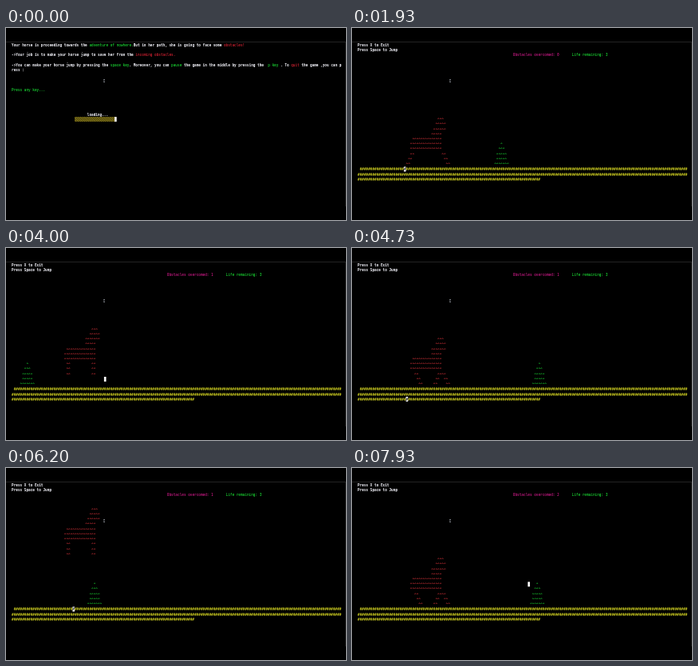
These frames come from a looping animation (426 by 240 pixels, 8000 ms). An HTML page with a canvas:

```html
<!DOCTYPE html>
<html lang="en">
<head>
<meta charset="utf-8">
<title>Horse jump</title>
<style>
html, body { margin: 0; width: 100%; height: 100%; overflow: hidden; background: #000; }
canvas { display: block; width: 100vw; height: 100vh; }
</style>
</head>
<body>
<canvas id="stage" width="426" height="240"></canvas>
<script>
const ctx = document.getElementById('stage').getContext('2d');

const LOOP = 8000, STEP = 1000 / 15;
const LEFT = 7, TOP = 18, CW = 2.633, CH = 6.23;
const WHITE = '#f8f8ff', GREEN = '#1eff3c', RED = '#ff283c',
      PINK = '#f01e9e', YELLOW = '#fafa28', HORSE = '#ff3c44';

// Each run of the obstacle: first step and columns moved per step.
const RUNS = [[10.9, 1.97], [62.6, 2.13], [110.1, 2.13]];
const START_COL = 104;

const INTRO = [
  [0, [['Your horse is proceeding towards the ', WHITE], ['adventure of nowhere.', GREEN],
       ['But in her path, she is going to face some ', WHITE], ['obstacles!', RED]]],
  [2, [['->Your job is to make your horse jump to save her from the ', WHITE],
       ['incoming obstacles.', RED]]],
  [4, [['->You can make your horse jump by pressing the ', WHITE], ['space key', GREEN],
       ['. Moreover, you can ', WHITE], ['pause', GREEN],
       [' the game in the middle by pressing the ', WHITE], [' p key', GREEN],
       [' . To ', WHITE], ['quit', RED], [' the game ,you can p', WHITE]]],
  [5, [['ress :', WHITE]]],
  [9, [['Press any key...', GREEN]]]
];

// Spans are [row, first column, length], rows counted from the head.
const BODY = [[0, 38, 3], [1, 37, 5], [3, 35, 5], [4, 26, 14], [5, 25, 15], [6, 25, 15]];
const LEGS = {
  stretch: [[7, 25, 2], [7, 40, 2], [8, 24, 2], [8, 41, 2], [9, 23, 2], [9, 42, 2]],
  gather: [[7, 27, 2], [7, 38, 4], [8, 28, 2], [8, 37, 2], [8, 41, 2],
           [9, 29, 2], [9, 36, 2], [9, 42, 2]],
  jump: [[7, 26, 2], [7, 38, 2], [8, 26, 2], [8, 38, 2], [9, 26, 2], [9, 38, 2]]
};
const GROUND_CURSOR = { 1: [60, 26], 10: [22, 25], 14: [23, 27], 17: [29, 25] };

const clamp = (v, lo, hi) => Math.min(hi, Math.max(lo, v));
const cellX = col => LEFT + col * CW;
const cellY = row => TOP + row * CH;

function print(text, col, row, color) {
  const weight = color === WHITE ? 'bold' : 'normal';
  ctx.save();
  ctx.translate(cellX(col), cellY(row) + 4.6);
  ctx.scale(0.1, 0.1);
  ctx.font = weight + ' 43.73px "DejaVu Sans Mono", monospace';
  ctx.fillStyle = color;
  ctx.fillText(text, 0, 0);
  ctx.restore();
}

function printParts(parts, row) {
  let col = 0;
  for (const [text, color] of parts) {
    print(text, col, row, color);
    col += text.length;
  }
}

function carets(col, row, count, color) {
  print('^'.repeat(count), col, row, color);
}

function cursor(col, row, char = '') {
  ctx.fillStyle = '#fff';
  ctx.fillRect(cellX(col), cellY(row) - 0.3, CW, 6);
  print(char, col, row, '#000');
}

function loadingBar(length) {
  const x = cellX(30), y = cellY(15) - 0.4, w = length * CW;
  ctx.save();
  ctx.beginPath();
  ctx.rect(x, y, w, CH);
  ctx.clip();
  ctx.fillStyle = '#51480c';
  ctx.fillRect(x, y, w, CH);
  ctx.strokeStyle = '#a39428';
  ctx.lineWidth = 0.7;
  ctx.beginPath();
  for (let i = -CH; i < w; i += CW) {
    ctx.moveTo(x + i, y);
    ctx.lineTo(x + i + CH, y + CH);
  }
  ctx.stroke();
  ctx.restore();
  cursor(30 + length, 15);
}

function drawIntro(step) {
  for (const [row, parts] of INTRO) printParts(parts, row);
  print('loading...', 36, 14, WHITE);
  loadingBar(19 + Math.min(step, 9));
}

function drawHorse(lift, pose, wideNeck) {
  const head = 15 - lift;
  const neck = wideNeck ? [2, 35, 7] : [2, 36, 6];
  for (const [row, col, count] of [...BODY, neck, ...LEGS[pose]]) {
    carets(col, head + row, count, HORSE);
  }
}

function drawObstacle(apex) {
  [1, 3, 5, 5, 7].forEach((w, i) => carets(apex - (w - 1) / 2, 20 + i, w, GREEN));
}

function drawGround() {
  print('#'.repeat(156), 1, 25, YELLOW);
  print('#'.repeat(157), 0, 26, YELLOW);
  print('#'.repeat(87), 0, 27, YELLOW);
}

function drawCursor(step, apex, lift) {
  const i = step % 19;
  if (GROUND_CURSOR[i]) cursor(...GROUND_CURSOR[i], '#');
  else if (i % 5 === 0) cursor(apex - 4, 20);
  else cursor(44, 25 - lift);
}

function drawGame(step) {
  const run = RUNS.filter(r => step >= r[0]).length - 1;
  const [start, speed] = RUNS[run];
  const apex = Math.max(3, Math.round(START_COL - (step - start) * speed));
  const rise = Math.floor((63 - apex) / 2), fall = Math.floor((apex - 1) / 3);
  const lift = clamp(Math.min(rise, fall), 0, 10);
  const gather = Math.floor(step / 2) % 2 === 1;
  const pose = lift ? 'jump' : gather ? 'gather' : 'stretch';
  const score = run + (apex < 20 ? 1 : 0);

  print('Press X to Exit', 0, 0, WHITE);
  print('Press Space to Jump', 0, 1, WHITE);
  print('Obstacles overcomed: ' + score, 74, 2, PINK);
  print('Life remaining: 3', 102, 2, GREEN);
  drawHorse(lift, pose, lift ? apex < 31 : gather);
  drawObstacle(apex);
  drawGround();
  drawCursor(step, apex, lift);
}

function drawWindow() {
  ctx.fillStyle = '#000';
  ctx.fillRect(0, 0, 426, 240);
  ctx.fillStyle = '#222';
  ctx.fillRect(0, 17, 426, 1);
  ctx.fillStyle = '#1c1c1c';
  ctx.fillRect(425, 18, 1, 205);
}

function drawPointer() {
  ctx.fillStyle = '#70747a';
  ctx.fillRect(122, 64, 2, 1);
  ctx.fillRect(122.5, 65, 0.8, 2);
  ctx.fillRect(122, 67, 2, 1);
}

function draw(now) {
  const step = Math.floor(((now + 5) % LOOP) / STEP);
  drawWindow();
  if (step < RUNS[0][0]) drawIntro(step);
  else drawGame(step);
  drawPointer();
}

const begin = performance.now();
function tick() {
  draw(performance.now() - begin);
  requestAnimationFrame(tick);
}
tick();
</script>
</body>
</html>
```
